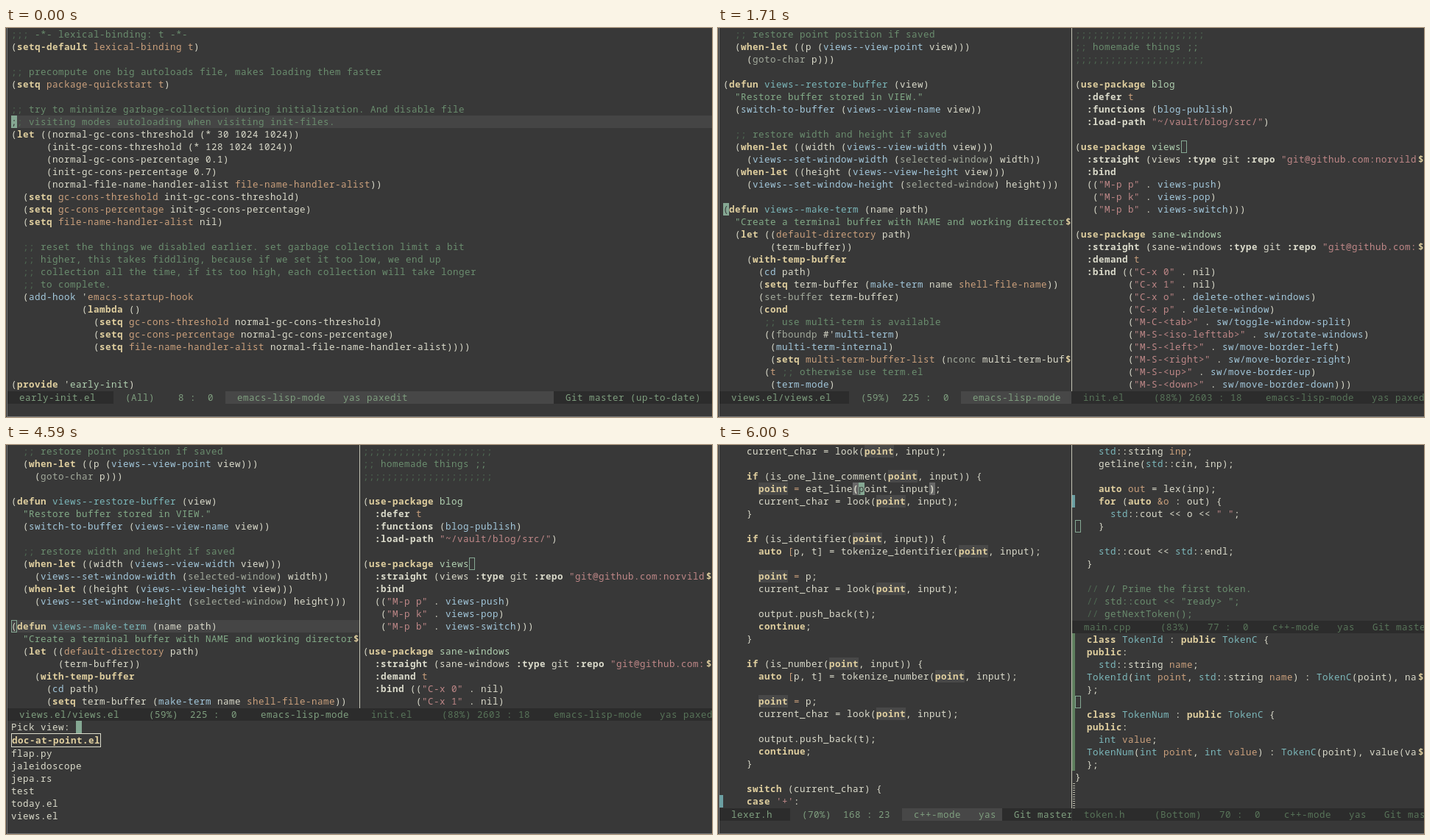
Animation of 959x529 px, one loop 8 s. Source, as an HTML page:

```html
<!DOCTYPE html>
<html lang="en">
<head>
<meta charset="utf-8">
<title>Switching views</title>
<style>
  html, body { margin: 0; width: 100%; height: 100%; overflow: hidden; background: #383838; }
  #stage {
    position: relative; width: 959px; height: 529px; overflow: hidden;
    background: #383838; color: #dcdccc;
    font: 12.5px/17px "Noto Sans Mono", "DejaVu Sans Mono", monospace;
    letter-spacing: calc(8px - 1ch);
    font-variant-ligatures: none;
  }
  #stage div { position: absolute; white-space: pre; box-sizing: border-box; }
  .k, .a { font-weight: 600; }
  .k { color: #e0cf9f; }
  .v { color: #cba07c; }
  .f { color: #7cb8bb; }
  .b { color: #a3c8dc; }
  .g { color: #a3aa9c; }
  .n { color: #b2d2b2; }
  .s { color: #c08888; }
  .d { color: #83ab88; }
  .c { color: #6a8d6e; }
  .m { color: #4e6852; }
  #stage .bar { display: flex; height: 17px; overflow: hidden; background: #2c2c2c; color: #7f9f7f; font-weight: 500; }
  .bar span { flex: none; }
  .bar .mode { flex: 1 0 auto; }
  .on .pos { background: #383838; }
  .on .mode { background: #474747; }
  #stage .dim { color: #587459; }
  .hl { background: #454545; }
  .cur { width: 8px; height: 17px; background: #85a893; color: #383838; }
  .hollow { width: 8px; height: 17px; border: 1px solid #85a893; }
  .paren { background: #686868; font-weight: 600; }
  .sym { background: #484848; color: #e0cf9f; font-weight: 600; }
  .hit { background: #2f4a36; color: #8fbf8f; font-weight: 600; }
  .sel { display: inline-block; border: 1px solid #dcdccc; font-weight: 600; color: #e0cf9f; vertical-align: top; }
  .panel { background: #383838; }
  .ticks { background: repeating-linear-gradient(#b8b8a8 0 1px, transparent 1px 3px); }
</style>
</head>
<body>
<div id="stage"></div>
<script>
const stage = document.getElementById('stage');
const LOOP = 8000, ROW = 17, COL = 8, LEFT = 7, RIGHT = 485, FOOT = 494, MINI = 358;
const timed = [];

function add(from, to, x, y, cls = '', w, h) {
  const el = document.createElement('div');
  el.className = cls;
  el.style.left = x + 'px';
  el.style.top = y + 'px';
  if (w) el.style.width = w + 'px';
  if (h) el.style.height = h + 'px';
  stage.append(el);
  timed.push({ el, from, to });
  return el;
}

function span(parent, text, cls = '') {
  const el = document.createElement('span');
  el.className = cls;
  el.textContent = text;
  parent.append(el);
}

// Syntax colouring
const lisp = [
  [/^(setq|setq-default|let|lambda|provide|defun|when-let|with-temp-buffer|cond|use-package)$/, 'k'],
  [/^(t|lexical-binding|package-quickstart|file-name-handler-alist|gc-cons-(threshold|percentage)|default-directory|shell-file-name|multi-term-buffer-list|emacs-startup-hook)$/, 'v'],
  [/^(goto-char|selected-window|set-buffer|nconc|fboundp)$/, 'g'],
  [/^(views-.*|sw\/.*|delete-.*|add-hook|switch-to-buffer|make-term|cd|multi-term|multi-term-internal|term-mode|blog-publish)$/, 'b'],
  [/^early-init$/, 'n']
];
const cpp = [
  [/^(if|for|auto|continue|switch|case|class|public)$/, 'k'],
  [/^(int|std|Token(Id|Num|C))$/, 'f']
];
const token = /(?:;;+|\/\/).*|"[^"]*"?|'\+'|(?<=\s):[a-z-]+|\w[\w\/+-]*|[^]/g;

function wordClass(word, line, at, rules) {
  const head = line.match(/^\((defun|use-package) (\S+)/);
  if (head && head[2] === word) return head[1] === 'defun' ? 'f' : 'n';
  if (rules === cpp && /(auto|int|string) &?$/.test(line.slice(0, at))) return 'v';
  const rule = rules.find(([re]) => re.test(word));
  return rule ? rule[1] : '';
}

function paint(el, line, rules) {
  for (const { 0: word, index } of line.matchAll(token)) {
    const note = word.match(/^(;;+ ?|\/\/ ?)(.*)$/);
    if (note) {
      span(el, note[1], 'm');
      span(el, note[2], 'c');
    } else if (/^["']./.test(word)) span(el, word, /^"[A-Z][a-z]/.test(word) ? 'd' : 's');
    else if (/^:[a-z]/.test(word)) span(el, word, 'a');
    else span(el, word, wordClass(word, line, index, rules));
  }
}

// A trailing $ marks a truncated line and hugs the window's right edge.
function code(from, to, x, y, edge, text, rules) {
  const lines = text.split('\n');
  lines.forEach((line, i) => {
    const cut = line.endsWith('$');
    const top = y + i * ROW;
    paint(add(from, to, x, top), cut ? line.slice(0, -1) : line, rules);
    if (cut) span(add(from, to, edge - COL, top), '$', 'k');
  });
  return lines;
}

function bar(from, to, x, y, w, state, [name, pct, row, col, mode, git = '']) {
  const el = add(from, to, x, y, 'bar ' + state, w);
  span(el, `  ${name}   `);
  span(el, `  ${pct} ${String(row).padStart(4)} : ${String(col).padStart(2)}  `, 'pos');
  span(el, `  ${mode} `, 'mode');
  span(el, git && `  ${git}  `);
}

function glyph(from, to, x, y, cls, text = '') {
  add(from, to, x, y, cls, COL * (text.length || 1), ROW).textContent = text;
}

const views = ['doc-at-point.el', 'flap.py', 'jaleidoscope', 'jepa.rs', 'test', 'today.el', 'views.el'];

function pick(from, to, query, done) {
  const top = MINI + ROW;
  const ask = add(from, to, LEFT, top);
  span(ask, 'Pick view: ', 'k0');
  span(ask, query);
  if (done) glyph(from, to, LEFT, top, 'cur', 'P');
  else glyph(from, to, LEFT + COL * (11 + query.length), top, 'cur');
  views.filter(v => v.startsWith(query)).forEach((v, i) => {
    const el = add(from, to, LEFT, top + ROW * (i + 1) + (i ? 2 : 0));
    if (!i) el.style.lineHeight = '17px';
    const hit = document.createElement('span');
    hit.className = 'hit';
    hit.textContent = query;
    if (!i) Object.assign(hit.style, { display: 'inline-block', verticalAlign: 'top', height: '19px', paddingTop: '1px', boxSizing: 'border-box' });
    el.append(hit);
    span(el, v.slice(query.length), i ? '' : 'sel');
  });
}

// First view: a single window
const A = 1710;
add(0, A, LEFT, 7 * ROW, 'hl', 952, ROW);
code(0, A, LEFT, 0, 959, `;;; -*- lexical-binding: t -*-
(setq-default lexical-binding t)

;; precompute one big autoloads file, makes loading them faster
(setq package-quickstart t)

;; try to minimize garbage-collection during initialization. And disable file
;; visiting modes autoloading when visiting init-files.
(let ((normal-gc-cons-threshold (* 30 1024 1024))
      (init-gc-cons-threshold (* 128 1024 1024))
      (normal-gc-cons-percentage 0.1)
      (init-gc-cons-percentage 0.7)
      (normal-file-name-handler-alist file-name-handler-alist))
  (setq gc-cons-threshold init-gc-cons-threshold)
  (setq gc-cons-percentage init-gc-cons-percentage)
  (setq file-name-handler-alist nil)

  ;; reset the things we disabled earlier. set garbage collection limit a bit
  ;; higher, this takes fiddling, because if we set it too low, we end up
  ;; collection all the time, if its too high, each collection will take longer
  ;; to complete.
  (add-hook 'emacs-startup-hook
            (lambda ()
              (setq gc-cons-threshold normal-gc-cons-threshold)
              (setq gc-cons-percentage normal-gc-cons-percentage)
              (setq file-name-handler-alist normal-file-name-handler-alist))))


(provide 'early-init)`, lisp);
glyph(0, 500, LEFT, 7 * ROW, 'cur', ';');
glyph(500, A, LEFT, 7 * ROW, 'hollow');
const early = pct => ['early-init.el', pct, 8, 0, 'emacs-lisp-mode   yas paxedit', 'Git master (up-to-date)'];
bar(0, 500, 2, FOOT, 958, 'on', early('(All)'));
add(500, A, 2, MINI, 'panel', 957, 170);
bar(500, A, 2, MINI, 958, '', early('(Top)'));
pick(500, 750, '');
pick(750, 920, 'v');
pick(920, 980, 'vi');
pick(980, 1040, 'vie');
pick(1040, A, 'view');

// Second view: two windows side by side
const B = 5500, defun = 14 * ROW, pkg = 9 * ROW, point = RIGHT + 18 * COL;
add(3170, 3380, RIGHT, pkg, 'hl', 474, ROW);
add(3380, B, LEFT, defun, 'hl', 473, ROW);
code(A, B, LEFT, 0, 480, `  ;; restore point position if saved
  (when-let ((p (views--view-point view)))
    (goto-char p)))

(defun views--restore-buffer (view)
  "Restore buffer stored in VIEW."
  (switch-to-buffer (views--view-name view))

  ;; restore width and height if saved
  (when-let ((width (views--view-width view)))
    (views--set-window-width (selected-window) width))
  (when-let ((height (views--view-height view)))
    (views--set-window-height (selected-window) height)))

(defun views--make-term (name path)
  "Create a terminal buffer with NAME and working director$
  (let ((default-directory path)
        (term-buffer))
    (with-temp-buffer
      (cd path)
      (setq term-buffer (make-term name shell-file-name))
      (set-buffer term-buffer)
      (cond
       ;; use multi-term is available
       ((fboundp #'multi-term)
        (multi-term-internal)
        (setq multi-term-buffer-list (nconc multi-term-buf$
       (t ;; otherwise use term.el
        (term-mode)`, lisp);
const semis = ';'.repeat(22);
code(A, B, RIGHT, 0, 959, `${semis}
;; homemade things ;;
${semis}

(use-package blog
  :defer t
  :functions (blog-publish)
  :load-path "~/vault/blog/src/")

(use-package views
  :straight (views :type git :repo "git@github.com:norvild$
  :bind
  (("M-p p" . views-push)
   ("M-p k" . views-pop)
   ("M-p b" . views-switch)))

(use-package sane-windows
  :straight (sane-windows :type git :repo "git@github.com:$
  :demand t
  :bind (("C-x 0" . nil)
         ("C-x 1" . nil)
         ("C-x o" . delete-other-windows)
         ("C-x p" . delete-window)
         ("M-C-<tab>" . sw/toggle-window-split)
         ("M-S-<iso-lefttab>" . sw/rotate-windows)
         ("M-S-<left>" . sw/move-border-left)
         ("M-S-<right>" . sw/move-border-right)
         ("M-S-<up>" . sw/move-border-up)
         ("M-S-<down>" . sw/move-border-down)))`, lisp);
add(A, B, 480, 0, 'divider', 1, FOOT).style.background = '#c4c4b4';

glyph(A, 3170, LEFT, defun, 'cur', '(');
glyph(3170, 3250, LEFT, defun, 'paren', '(');
glyph(3170, 3380, LEFT, defun, 'hollow');
glyph(3380, 4590, LEFT, defun, 'cur', '(');
for (const [from, to] of [[1880, 3170], [3460, 4590]]) {
  const el = add(from, to, LEFT, defun, 'cur');
  el.textContent = '(';
  el.style.color = '#686868';
}
glyph(4590, B, LEFT, defun, 'hollow');
glyph(A, 3170, point, pkg, 'hollow');
glyph(3170, 3380, point, pkg, 'cur');
glyph(3380, B, point, pkg, 'hollow');

const viewsEl = ['views.el/views.el', '(59%)', 225, 0, 'emacs-lisp-mode   yas paxedit'];
const initEl = ['init.el', '(88%)', 2603, 18, 'emacs-lisp-mode   yas paxedit'];
for (const [from, to, left] of [[A, 3170, true], [3170, 3380, false], [3380, 4590, true]]) {
  bar(from, to, 2, FOOT, 478, left ? 'on' : 'dim', viewsEl);
  bar(from, to, 480, FOOT, 479, left ? 'dim' : 'on', initEl);
}
add(4590, B, 2, MINI, 'panel', 957, 170);
bar(4590, B, 2, MINI, 478, '', viewsEl);
bar(4590, B, 480, MINI, 479, 'dim', initEl);
pick(4590, 4840, '');
pick(4840, 5000, 'j');
pick(5000, 5040, 'ja');
pick(5040, 5420, 'jal');
pick(5420, B, 'jal', true);

// Third view: three windows
const lexer = code(B, LOOP, LEFT, 0, 480, `    current_char = look(point, input);

    if (is_one_line_comment(point, input)) {
      point = eat_line(point, input);
      current_char = look(point, input);
    }

    if (is_identifier(point, input)) {
      auto [p, t] = tokenize_identifier(point, input);

      point = p;
      current_char = look(point, input);

      output.push_back(t);
      continue;
    }

    if (is_number(point, input)) {
      auto [p, t] = tokenize_number(point, input);

      point = p;
      current_char = look(point, input);

      output.push_back(t);
      continue;
    }

    switch (current_char) {
    case '+':`, cpp);
code(B, LOOP, RIGHT, 0, 959, `    std::string inp;
    getline(std::cin, inp);

    auto out = lex(inp);
    for (auto &o : out) {
      std::cout << o << " ";
    }

    std::cout << std::endl;
  }

  // // Prime the first token.
  // std::cout << "ready> ";
  // getNextToken();`, cpp);
code(B, LOOP, RIGHT, 256, 959, `  class TokenId : public TokenC {
  public:
    std::string name;
  TokenId(int point, std::string name) : TokenC(point), na$
  };

  class TokenNum : public TokenC {
  public:
    int value;
  TokenNum(int point, int value) : TokenC(point), value(va$
  };
}`, cpp);
lexer.forEach((line, i) => {
  const at = line.indexOf('point');
  if (at >= 0) glyph(6000, LOOP, LEFT + at * COL, i * ROW, 'sym', 'point');
});
glyph(5590, LOOP, LEFT + 22 * COL, 3 * ROW, 'paren', '(');
glyph(5590, LOOP, LEFT + 35 * COL, 3 * ROW, 'paren', ')');
glyph(B, LOOP, LEFT + 23 * COL, 3 * ROW, 'cur', 'p');
glyph(B, LOOP, RIGHT, 6 * ROW, 'hollow');
glyph(B, LOOP, RIGHT, 256 + 5 * ROW, 'hollow');
add(B, LOOP, 480, 0, 'divider', 1, FOOT).style.background = '#c4c4b4';
const fringe = (x, y, h, color) => { add(B, LOOP, x, y, '', x < 9 ? 5 : 4, h).style.background = color; };
fringe(2, 28 * ROW, ROW, '#6ca0a3');
fringe(481, 4 * ROW, ROW, '#6ca0a3');
fringe(481, 256, 11 * ROW, '#5f7f5f');
add(B, LOOP, 482, 460, 'ticks', 3, 34);
bar(B, LOOP, 2, FOOT, 478, 'on', ['lexer.h', '(70%)', 168, 23, 'c++-mode   yas', 'Git master']);
bar(B, LOOP, 481, 239, 478, 'dim', ['main.cpp', '(83%)', 77, 0, 'c++-mode   yas', 'Git master']);
bar(B, LOOP, 481, FOOT, 478, 'dim', ['token.h', '(Bottom)', 70, 0, 'c++-mode   yas', 'Git master']);

// Frame edges
add(0, LOOP, 1, 0, '', 1, 529).style.background = '#777';
add(0, LOOP, 1, 528, '', 958, 1).style.background = '#777';

const start = performance.now();
function tick() {
  const t = (performance.now() - start) % LOOP;
  for (const { el, from, to } of timed) {
    el.style.visibility = t >= from && t < to ? 'visible' : 'hidden';
  }
  requestAnimationFrame(tick);
}
tick();
</script>
</body>
</html>
```
